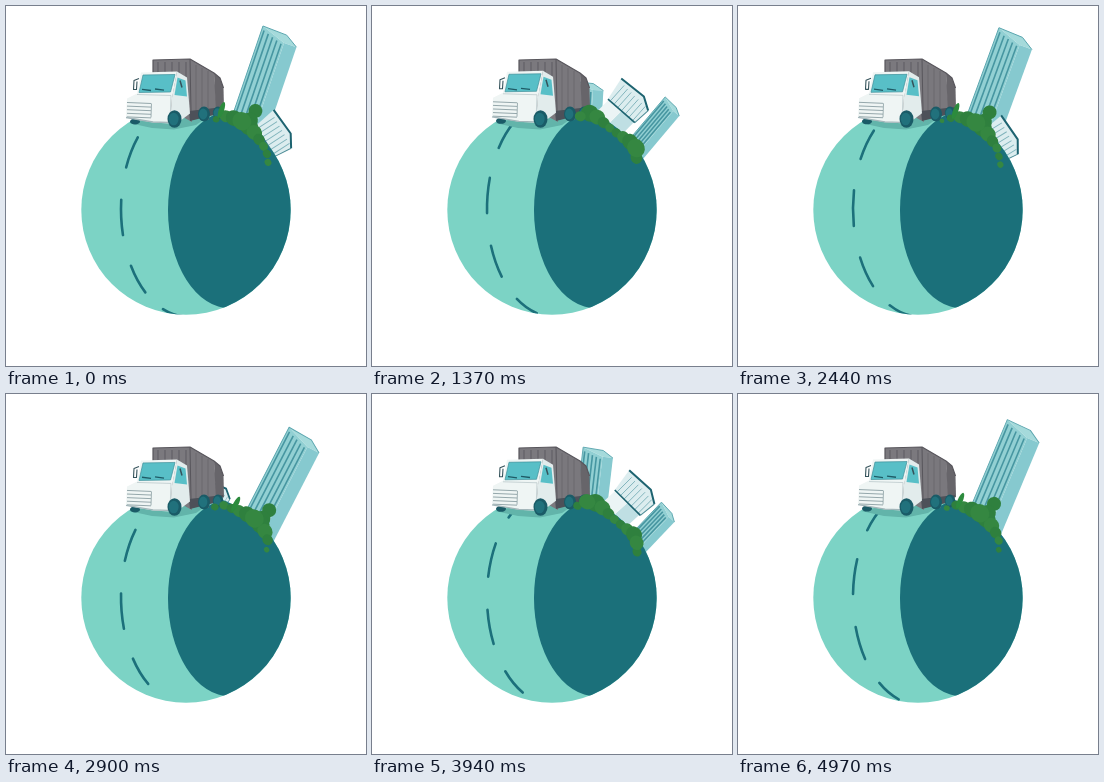
Write an HTML page with a canvas that moves like this. It is 360 px wide and 360 px high and loops after 5.01 s.

```html
<!DOCTYPE html>
<html lang="en">
<head>
<meta charset="utf-8">
<title>Truck on a small planet</title>
<style>
  html, body { margin: 0; width: 100%; height: 100%; overflow: hidden; background: #fff; }
  canvas { display: block; width: 360px; height: 360px; }
</style>
</head>
<body>
<canvas id="stage"></canvas>
<script>
const LOOP = 5010;
const CYCLE = 2360;                  // time for one block of scenery to pass
const TURN = 0.0156;                 // scenery speed, degrees per ms
const BLOCK = CYCLE * TURN;          // angle of one block, also the dash spacing
const CX = 180, CY = 204, R = 104.7;
const RAD = Math.PI / 180;

const canvas = document.getElementById('stage');
const ctx = canvas.getContext('2d');
const dpr = window.devicePixelRatio || 1;
canvas.width = canvas.height = 360 * dpr;

const span = (v, from, to) => Math.max(0, Math.min(1, (v - from) / (to - from)));
const smooth = k => k * k * (3 - 2 * k);
const easeOut = (k, power) => 1 - (1 - k) ** power;

function trace(points, closed) {
  ctx.beginPath();
  points.forEach(([x, y], i) => i ? ctx.lineTo(x, y) : ctx.moveTo(x, y));
  if (closed) ctx.closePath();
}

function poly(fill, ...points) {
  trace(points, true);
  ctx.fillStyle = fill;
  ctx.fill();
}

function line(color, width, ...points) {
  trace(points, false);
  ctx.strokeStyle = color;
  ctx.lineWidth = width;
  ctx.stroke();
}

// Evenly spaced parallel lines; each step shifts both ends.
function hatch(color, width, count, [x1, y1], [x2, y2], [dx, dy]) {
  for (let i = 0; i < count; i++) {
    line(color, width, [x1 + dx * i, y1 + dy * i], [x2 + dx * i, y2 + dy * i]);
  }
}

function oval(fill, x, y, rx, ry = rx) {
  ctx.beginPath();
  ctx.ellipse(x, y, rx, ry, 0, 0, 2 * Math.PI);
  ctx.fillStyle = fill;
  ctx.fill();
}

// Draws with the planet centre as origin and "up" pointing away from it.
function onPlanet(degrees, draw) {
  ctx.save();
  ctx.translate(CX, CY);
  ctx.rotate(degrees * RAD);
  draw();
  ctx.restore();
}

function tower(t) {
  if (t < -1260 || t > 2300) return;
  const rise = easeOut(span(t, -1260, -180), 1.4);
  const sink = span(t, 800, 2300);
  const slim = (.8 + .2 * span(t, -760, 0)) * (1 - .4 * smooth(span(t, 770, 1200)));
  const w = 38.5 * slim, left = 13.5, right = left + w, fold = left + w * .66;
  const top = -95 - 104 * (rise - sink), eave = top + w * .24, foot = -70;
  onPlanet(18.8 + TURN * t, () => {
    poly('#a5dadb', [left, top], [left + w * .66, top + 1], [right, eave], [fold, eave]);
    poly('#92d0d3', [left, top], [fold, eave], [fold, foot], [left, foot]);
    poly('#86c9cf', [fold, eave], [right, eave], [right, foot], [fold, foot]);
    const step = (fold - left) / 5;
    hatch('#4796a1', 1.6, 5, [left + step / 2, top + 4], [left + step / 2, foot], [step, w * .045]);
    line('#5ba6af', .9, [left, foot], [left, top], [left + w * .66, top + 1], [right, eave]);
  });
}

function house(t) {
  if (t < 350 || t > 2620) return;
  const rise = easeOut(span(t, 350, 1500), 1.9);
  const top = -98 - 45 * (rise - span(t, 2050, 2620) ** 1.6);
  onPlanet(23.2 + TURN * t, () => {
    ctx.translate(-43, top);
    ctx.scale(.55 + .45 * rise, 1);
    poly('#dcedef', [0, 0], [29, -3], [42, 4], [41, 22], [5, 24]);
    poly('#bfdfe3', [23, 23], [40, 22], [40, 50], [23, 50]);
    poly('#ebf4f5', [6, 24], [23, 23], [23, 50], [6, 50]);
    hatch('#7fb3bb', .9, 7, [7, 3], [8, 23], [5, 0]);
    line('#1d6370', 2, [0, 0], [29, -3], [42, 4]);
    line('#1d6370', 1.6, [5, 24], [41, 22]);
    line('#4c8b95', 1, [42, 4], [41, 22]);
  });
}

// The hedge runs all round the block, tallest near 34 degrees.
function hedge(turned) {
  const count = 8;
  for (let i = 0; i < count; i++) {
    const angle = i * BLOCK / count;
    const seen = angle + turned;
    const grown = smooth(Math.min(span(seen, 15, 23), span(seen, 62, 52)));
    if (!grown) continue;
    const size = 6.6 + 2.4 * Math.cos((angle - 34) / BLOCK * 2 * Math.PI);
    const r = size * (.5 + .5 * grown);
    onPlanet(seen, () => oval(i % 2 ? '#358741' : '#2f803e', 0, -88 - size - 8 * grown, r * 1.1, r));
  }
}

function tree(turned) {
  const seen = 35 + turned;
  const grown = smooth(Math.min(span(seen, 22, 27), span(seen, 58, 48)));
  if (!grown) return;
  onPlanet(seen, () => {
    oval('#2f803e', 0, -98 - 23 * grown, 7 * grown);
    oval('#2f803e', 1, -96 - 14 * grown, 8 * grown);
  });
}

function leaf(turned) {
  const seen = 19.5 + turned;
  const grown = smooth(Math.min(span(seen, 10, 15), span(seen, 36, 31)));
  if (grown) onPlanet(seen, () => oval('#2c8b3d', 0, -106, 2.6 * grown, 8.5 * grown));
}

function planet(t) {
  ctx.save();
  oval('#7cd3c5', CX, CY, R);
  ctx.clip();

  // Road markings ride an ellipse around the left of the globe.
  ctx.strokeStyle = '#1c707b';
  ctx.lineWidth = 2.6;
  ctx.lineCap = 'round';
  const shift = (4 * TURN * t - 4.6) % BLOCK;
  for (let i = -2; i <= 2; i++) {
    const mid = 180 + shift + i * BLOCK;
    ctx.beginPath();
    ctx.ellipse(181, 203, 66, 107.5, 0, (mid - 9.5) * RAD, (mid + 9.5) * RAD);
    ctx.stroke();
  }
  oval('#1b707a', 224.5, CY, 62.5, 98.5);
  ctx.restore();
}

function wheel(x, y, r) {
  oval('#1a5b67', x, y, r, r * 1.25);
  oval('#21717c', x - .8, y, r * .7, r * .9);
}

function truck(t) {
  poly('#62b4aa', [123, 117], [146, 122], [168, 123.5], [190, 119], [200, 112], [165, 108]);

  // Container
  poly('#7b797e', [147, 54], [184, 53], [186, 116], [147, 95]);
  poly('#7a787d', [184, 53], [208, 67], [211, 104], [183, 114]);
  poly('#67656a', [208, 67], [214, 72], [217.5, 82], [218, 103], [210, 106]);
  hatch('#605e64', 1.1, 5, [152, 56], [152, 76], [7, 0]);
  hatch('#6b696e', 1, 3, [190, 59], [190, 108], [6, 3]);
  line('#58565c', 1.2, [147, 76], [147, 54], [184, 53], [208, 67], [214, 72], [217.5, 82]);
  line('#58565c', 1, [184, 53], [185, 105]);
  poly('#4d5159', [183, 105], [217, 101], [216, 107], [184, 115]);
  wheel(198, 108, 6);
  wheel(212, 107, 5.2);

  // Cab
  ctx.save();
  ctx.translate(0, .5 * Math.cos(t * 8 * Math.PI / CYCLE));
  oval('#1a5b67', 129, 115, 5, 3);
  poly('#eff5f4', [135, 66], [171, 65], [166, 92], [164, 117], [147, 116], [120, 111], [121, 92], [131, 87]);
  poly('#e2ecec', [171, 65], [181, 71], [184, 107], [176, 113], [164, 117], [166, 91]);
  poly('#58bfc7', [137, 68.5], [169, 68], [164.5, 85.5], [133, 86]);
  poly('#58bfc7', [171.5, 71], [179.5, 74], [181, 90], [168.5, 88.5]);
  line('#3f909a', .7, [137, 68.5], [169, 68], [164.5, 85.5], [133, 86], [137, 68.5]);
  hatch('#1f5b66', 1.3, 2, [136, 82.8], [145, 84], [13, -.3]);
  line('#bccacc', .8, [131, 88], [165, 89], [164, 116]);
  line('#35535b', 1.1, [133, 72], [128, 74], [127.5, 83], [130.5, 83], [131, 75]);
  line('#35535b', 1.5, [174, 74], [176, 81]);

  // Grille and bumper
  hatch('#8b9fa3', .9, 5, [121, 96], [145, 97], [0, 3.6]);
  line('#8b9fa3', .8, [145.5, 97], [145, 111]);
  line('#a3b6ba', 1.3, [120, 111], [147, 115.5], [162, 116]);
  ctx.restore();
  wheel(168.5, 113, 7);
}

function render(t) {
  const phase = t % CYCLE;
  const ages = [phase + CYCLE, phase, phase - CYCLE];
  const turns = ages.map(age => age * TURN);
  ctx.setTransform(dpr, 0, 0, dpr, 0, 0);
  ctx.lineCap = 'butt';
  ctx.lineJoin = 'round';
  ctx.fillStyle = '#fff';
  ctx.fillRect(0, 0, 360, 360);
  ages.forEach(tower);
  ages.forEach(house);
  planet(t);
  truck(t);
  [tree, hedge, leaf].forEach(plant => turns.forEach(plant));
}

const start = performance.now();
function tick() {
  render((performance.now() - start) % LOOP);
  requestAnimationFrame(tick);
}
tick();
</script>
</body>
</html>
```
